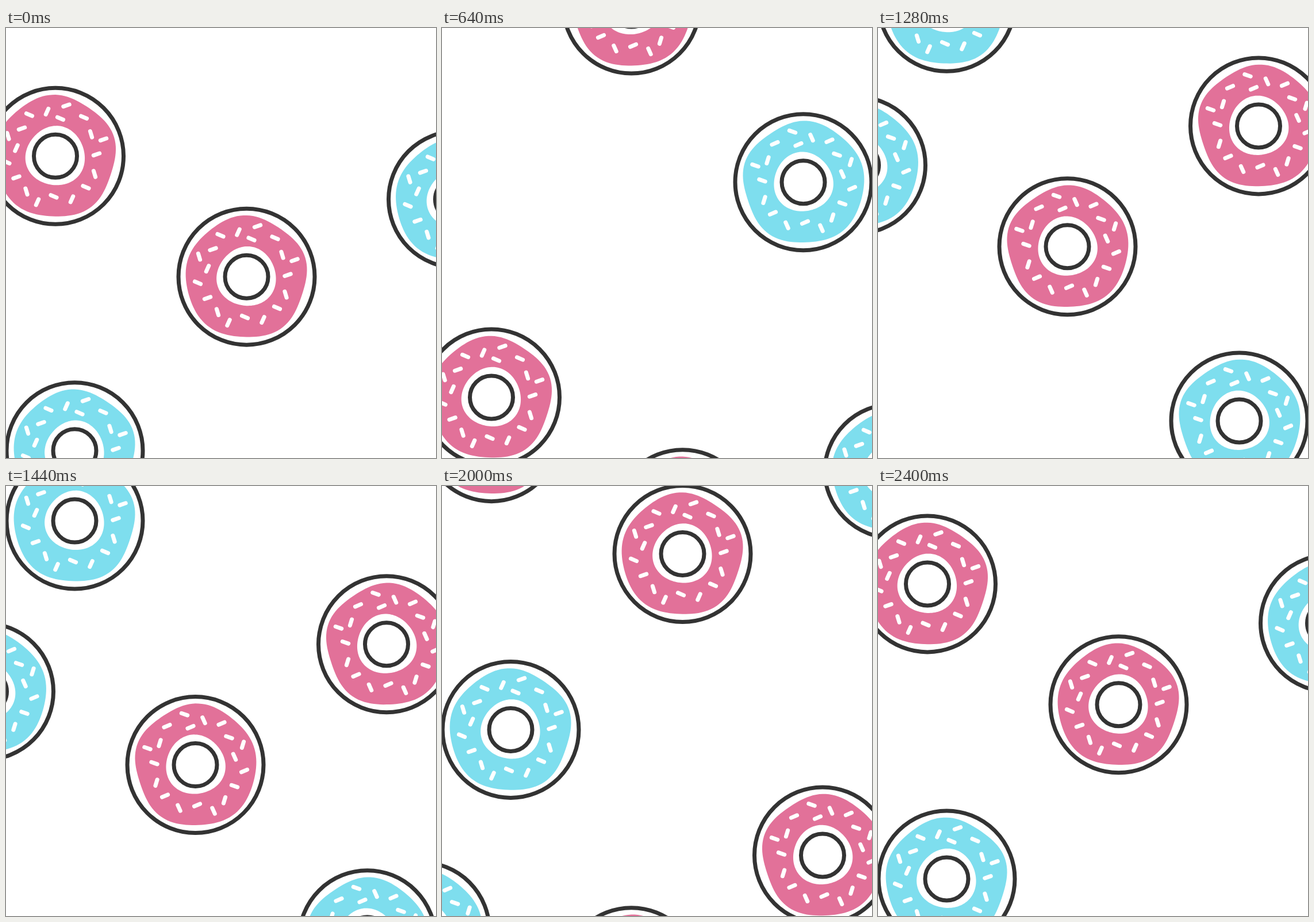
Animation, 748 px wide and 748 px high, one loop 2480 ms. Source, as an HTML page:

```html
<!DOCTYPE html>
<html lang="en">
<head>
<meta charset="utf-8">
<title>Falling donuts</title>
<style>
html, body { margin: 0; width: 100%; height: 100%; overflow: hidden; background: #fff; }
svg { display: block; width: 100%; height: 100%; }
</style>
</head>
<body>
<svg id="stage" viewBox="0 0 748 748"></svg>
<script>
const NS = 'http://www.w3.org/2000/svg';
const STEP = 80, STEPS = 31, SIZE = 748, HALF_LOOP = 14;
const INK = '#333333', PINK = '#e27199', BLUE = '#7edeee';
const { sin, cos, floor, max, PI } = Math;

// Wobbly radii of the glaze, by angle
const rim = a => 105.4 - 2.1 * sin(5 * a) - 0.9 * sin(4 * a)
  + 1.4 * cos(a - 2.2) - 0.7 * cos(2 * a - 0.98);
const gap = a => 51.6 + 1.3 * cos(3 * a - 2.1);

// Sprinkle centres, grouped by tilt
const sprinkles = [
  { tilt: 23, at: [[-45.5, -72], [8.5, -65.5], [49.5, -67.5], [-85, 10.5], [-3, 70], [53, 54]] },
  { tilt: -66, at: [[-14.5, -77.5], [-68, -14], [-31.5, 80], [28.5, 75]] },
  { tilt: 73, at: [[-82.5, -35], [68, 31], [62, -38], [-50.5, 61.5]] },
  { tilt: -19, at: [[19, -88], [-58.5, -48], [-68, 37], [71.5, -3], [83.5, -29]] }
];

// Height after k steps; the fast fall speeds up on its way down
const pinkFall = k => -144.3 + 52.45 * k;
const blueFall = k => -147 + 51.9 * k;
const fastFall = k => -184 + 51.9 * k + 7.5 * max(0, k - 7);

const kinds = [
  { x: 86, color: PINK, start: 24, fall: pinkFall },
  { x: 418.5, color: PINK, start: 20, fall: pinkFall },
  { x: 119.5, color: BLUE, start: 14, fall: blueFall },
  { x: 784, color: BLUE, start: 22, fall: fastFall }
];

const mod = (a, n) => ((a % n) + n) % n;

function add(parent, tag, attrs) {
  const el = document.createElementNS(NS, tag);
  for (const name in attrs) el.setAttribute(name, attrs[name]);
  parent.appendChild(el);
  return el;
}

function outline(radius, count = 120) {
  const points = Array.from({ length: count }, (_, i) => {
    const a = 2 * PI * i / count, r = radius(a);
    return [r * cos(a), r * sin(a)].map(v => v.toFixed(2));
  });
  return `M${points.join('L')}Z`;
}

const glaze = outline(rim) + outline(gap);
const stage = document.getElementById('stage');

function donut(color) {
  const g = add(stage, 'g', {});
  const ring = r => add(g, 'circle', { r, fill: '#fff', stroke: INK, 'stroke-width': 7 });
  ring(118.5);
  add(g, 'path', { d: glaze, fill: color, 'fill-rule': 'evenodd' });
  for (const { tilt, at } of sprinkles) {
    for (const [x, y] of at) {
      add(g, 'path', {
        d: 'M-5.5 0H5.5', stroke: '#fff', 'stroke-width': 7, 'stroke-linecap': 'round',
        transform: `translate(${x} ${y}) rotate(${tilt})`
      });
    }
  }
  ring(37.5);
  return g;
}

// Each kind falls twice per loop: as is, and mirrored on the other side
const donuts = kinds.flatMap(({ x, color, start, fall }) => [
  { el: donut(color), x, start, fall, flip: 1 },
  { el: donut(color), x: SIZE - x, start: start - HALF_LOOP, fall, flip: -1 }
]);

function draw(ms) {
  const step = floor(mod(ms, STEP * STEPS) / STEP);
  for (const { el, x, start, fall, flip } of donuts) {
    const y = fall(mod(step - start, STEPS)).toFixed(2);
    el.setAttribute('transform', `translate(${x} ${y}) scale(${flip} 1)`);
  }
}

const begin = performance.now();
function tick() {
  draw(performance.now() - begin);
  requestAnimationFrame(tick);
}
draw(0);
requestAnimationFrame(tick);
</script>
</body>
</html>
```
